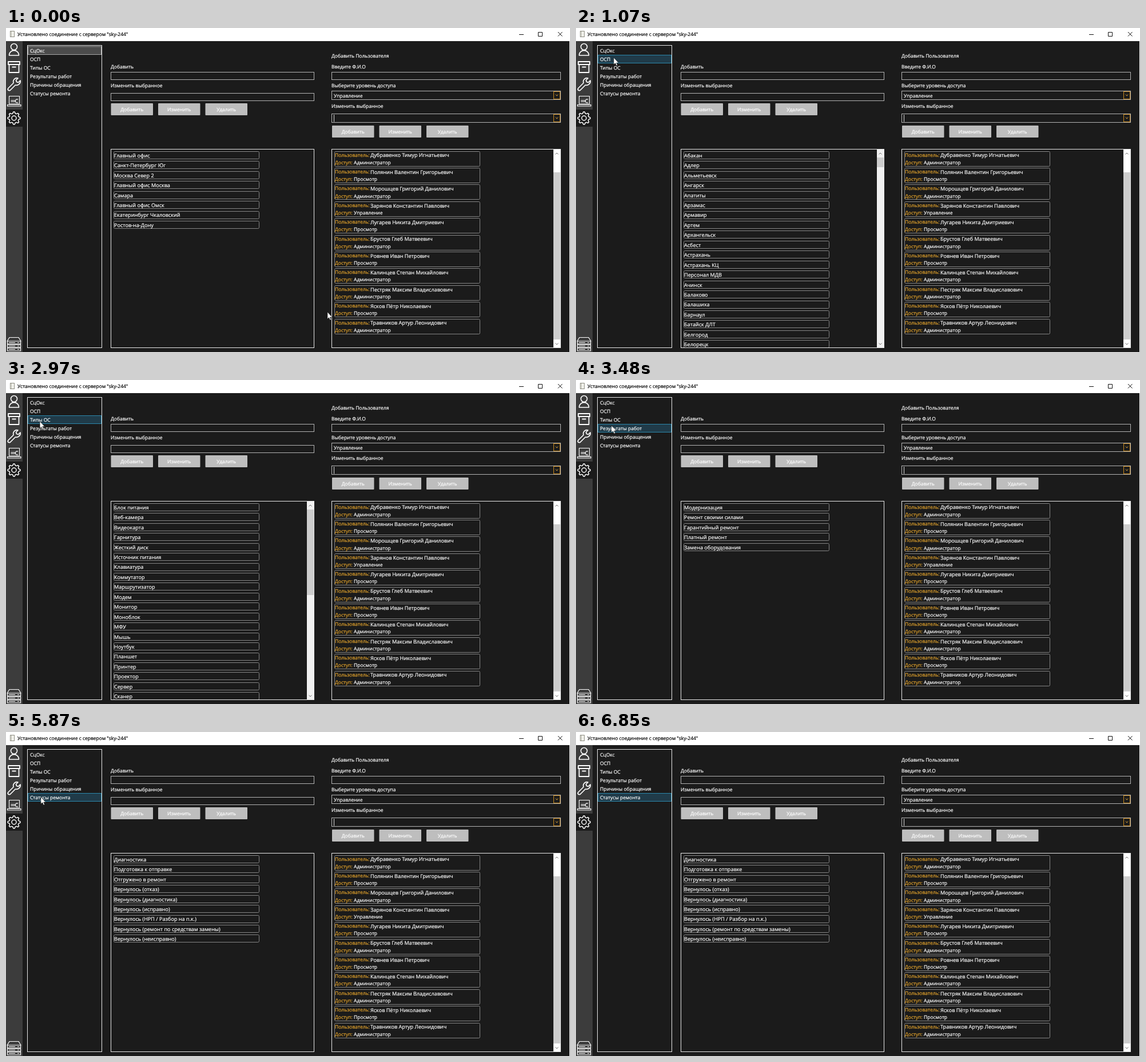
An HTML page that plays this animation: 986x568 px, repeating every 7660 ms.

```html
<!DOCTYPE html>
<html lang="ru">
<head>
<meta charset="utf-8">
<style>
html, body { margin: 0; width: 100%; height: 100%; overflow: hidden; background: #fff; }
svg { display: block; }
text { font-family: "Open Sans", "Noto Sans", sans-serif; text-rendering: geometricPrecision; white-space: pre; stroke-width: .2; }
</style>
</head>
<body>
<svg id="stage" width="986" height="568" viewBox="0 0 986 568"></svg>
<script>
const LOOP = 7660, ROW = 17.45, USER_ROW = 29.4;
const SMALL = 8.5, LARGE = 9.1;

const menu = ['СцОкс', 'ОСП', 'Типы ОС', 'Результаты работ', 'Причины обращения', 'Статусы ремонта'];
const lists = [
  'Главный офис|Санкт-Петербург Юг|Москва Север 2|Главный офис Москва|Самара|Главный офис Омск|Екатеринбург Чкаловский|Ростов-на-Дону',
  'Абакан|Адлер|Альметьевск|Ангарск|Апатиты|Арзамас|Армавир|Артем|Архангельск|Асбест|Астрахань|Астрахань КЦ|Персонал МДВ|Ачинск|Балаково|Балашиха|Барнаул|Батайск ДЛТ|Белгород|Белорецк',
  'Блок питания|Веб-камера|Видеокарта|Гарнитура|Жесткий диск|Источник питания|Клавиатура|Коммутатор|Маршрутизатор|Модем|Монитор|Моноблок|МФУ|Мышь|Ноутбук|Планшет|Принтер|Проектор|Сервер|Сканер',
  'Модернизация|Ремонт своими силами|Гарантийный ремонт|Платный ремонт|Замена оборудования',
  'Не включается|Не работает|Плановая замена|Повреждение',
  'Диагностика|Подготовка к отправке|Отгружено в ремонт|Вернулось (отказ)|Вернулось (диагностика)|Вернулось (исправно)|Вернулось (НРП / Разбор на п.к.)|Вернулось (ремонт по средствам замены)|Вернулось (неисправно)'
].map(s => s.split('|'));
const users = [
  ['Дубравенко Тимур Игнатьевич', 'Администратор'],
  ['Полянин Валентин Григорьевич', 'Просмотр'],
  ['Морошцев Григорий Данилович', 'Администратор'],
  ['Зарянов Константин Павлович', 'Управление'],
  ['Лугарев Никита Дмитриевич', 'Просмотр'],
  ['Брустов Глеб Матвеевич', 'Администратор'],
  ['Ровнев Иван Петрович', 'Просмотр'],
  ['Калинцев Степан Михайлович', 'Администратор'],
  ['Пестряк Максим Владиславович', 'Администратор'],
  ['Ясков Пётр Николаевич', 'Просмотр'],
  ['Травников Артур Леонидович', 'Администратор']
];

const text = (x, y, s, size = SMALL, fill = '#fff', extra = '') =>
  `<text x="${x}" y="${Math.round(y)}" font-size="${size}" fill="${fill}" stroke="${fill}" ${extra}>${s}</text>`;
const rect = (x, y, w, h, fill = 'none', stroke = 'none', extra = '') =>
  `<rect x="${x}" y="${y}" width="${w}" height="${h}" fill="${fill}" stroke="${stroke}" ${extra}/>`;
const path = (d, stroke = '#fff', width = 1.5, fill = 'none') =>
  `<path d="${d}" stroke="${stroke}" stroke-width="${width}" fill="${fill}" stroke-linejoin="round"/>`;
const field = (x, y, w, h) => rect(x, y, w, h, 'none', '#b4b4b4');

function buttons(x, y) {
  return ['Добавить', 'Изменить', 'Удалить'].map((s, i) =>
    rect(x + i * 82.5, y, 73.5, 21, '#bebebe', 'none', 'rx="1"') +
    text(x + i * 82.5 + 36.7, y + 14, s, SMALL, '#fff', 'text-anchor="middle"')).join('');
}

function combo(y) {
  return field(569.5, y, 400, 15) + rect(957.5, y + 1, 11, 13, 'none', '#c98a1e') +
    path(`M961 ${y + 6}l2 2.5 2-2.5`, '#d9a03a', 1);
}

function scrollbar(x, top, height, track) {
  return rect(x, 213, 12, 347, track) + rect(x, top, 12, height, '#cdcdcd') +
    path(`M${x + 3.5} 221.5l2.5-2.5 2.5 2.5M${x + 3.5} 552.5l2.5 2.5 2.5-2.5`, '#707070', 1);
}

function listView(items, i) {
  const rows = items.map((s, k) => {
    const y = Math.floor(216.3 + k * ROW);
    return rect(188.5, y + .5, 254, 13, 'none', '#858585', 'rx="2"') +
      text(189, 226.7 + k * ROW, s, LARGE);
  }).join('');
  const bar = i == 1 ? scrollbar(526, 227, 17, '#f1f1f1') : i == 2 ? scrollbar(526, 227, 150, '#f1f1f1') : '';
  return `<g class="list" clip-path="url(#inner)">${rows}${bar}</g>`;
}

function userView([name, access], i) {
  const y = 216 + i * USER_ROW, gold = '#e6a52c';
  return rect(574.5, Math.floor(y) + .5, 254, 26, 'none', '#858585', 'rx="2"') +
    text(575, y + 9.5, 'Пользователь:', SMALL, gold) + text(637, y + 10.4, name, LARGE) +
    text(575, y + 22.7, 'Доступ:', SMALL, gold) + text(608, y + 22.7, access);
}

function gear(cx, cy) {
  let d = '';
  for (let i = 0; i < 32; i++) {
    const a = (i - .5) * Math.PI / 16, r = i % 4 < 2 ? 11 : 8.4;
    d += `${i ? 'L' : 'M'}${(cx + r * Math.cos(a)).toFixed(1)} ${(cy + r * Math.sin(a)).toFixed(1)}`;
  }
  return path(d + 'Z') + `<circle cx="${cx}" cy="${cy}" r="4" fill="none" stroke="#fff" stroke-width="1.5"/>`;
}

const wrench = 'M4 105.5L13 96.5C11.5 91 16 86.5 21 88L17.5 91.5 18.5 94.5 21.5 95.5 25 92C26 97 21.5 101.5 16.5 100L7.5 109C4.5 111 2 108 4 105.5Z';
const icons =
  '<circle cx="14" cy="33" r="5.5" fill="none" stroke="#fff" stroke-width="1.6"/>' +
  path('M5.5 48C5.5 36.5 22.5 36.5 22.5 48Z', '#fff', 1.6) +
  path('M4 59H24V64H4ZM5.5 64V78H22.5V64M10.5 68.5H17.5', '#fff', 1.8) +
  path(wrench, '#fff', 1.7) +
  path('M5.5 133V119.5H23.5V133ZM2.5 134.5H26V137H2.5ZM8.5 127H16M8.5 129H16M21 125.5A3 3 0 1 0 21 130.5', '#fff', 1.1) +
  gear(14, 158) +
  path('M6 542.5H22L26 549H2ZM2.5 549H25.5V554H2.5ZM2.5 555H25.5V560H2.5ZM2.5 561H25.5V566H2.5ZM5 551.5H16M5 557.5H16M5 563.5H16M20 551.5H23M20 557.5H23M20 563.5H23', '#fff', 1.2);

const stage = document.getElementById('stage');
stage.innerHTML =
  '<clipPath id="inner"><rect x="184" y="213" width="354" height="347"/></clipPath>' +
  rect(0, 0, 986, 568, '#fff') + rect(0, 23, 985, 545, '#1b1b1b') +
  rect(0, 23, 29, 545, '#3c3c3c') + rect(0, 143, 29, 30, '#1b1b1b') +
  rect(7.5, 5.5, 7, 10, '#f4f4ee', '#8b8b80') + path('M9.5 6V15', '#b0b0a4', 1) +
  text(20, 14, 'Установлено соединение с сервером "sky-244"', SMALL, '#000') +
  path('M897 11.5H905M930.5 7.5H937.5V14.5H930.5ZM965 7L972.5 14.5M972.5 7L965 14.5', '#111', 1) +
  icons +
  rect(37.5, 30.5, 130, 530, 'none', '#e8e8e8') +
  menu.map((s, i) => rect(38.5, 32.5 + i * 15, 128, 14, 'none', 'none', 'class="item"') +
    text(42, 43 + i * 15, s)).join('') +
  text(183, 71, 'Добавить') + field(183.5, 77.5, 355, 13) +
  text(183, 104, 'Изменить выбранное') + field(183.5, 114.5, 355, 13) +
  buttons(183.5, 132) +
  text(569, 52, 'Добавить Пользователя') + text(569, 71, 'Введите Ф.И.О') +
  field(569.5, 77.5, 400, 13) + text(569, 104, 'Выберите уровень доступа') +
  combo(110.5) + text(573, 122, 'Управление') +
  text(569, 140, 'Изменить выбранное') + combo(150.5) + path('M573.5 152V164.5', '#ddd', 1) +
  buttons(570, 171) +
  rect(183.5, 212.5, 355, 348, 'none', '#e8e8e8') + lists.map(listView).join('') +
  rect(571.5, 0, 384, 28, '#1d2930', '#256279', 'id="hover"') +
  users.map(userView).join('') + scrollbar(957, 253, 293, '#fff') +
  rect(569.5, 212.5, 400, 348, 'none', '#e8e8e8') +
  '<path id="cursor" d="M0 0V12L2.7 9.6 4.6 14 6.5 13.2 4.6 9H8.3Z" fill="#fff" stroke="#111" stroke-width=".5"/>';

const items = stage.querySelectorAll('.item'), views = stage.querySelectorAll('.list');
const hover = document.getElementById('hover'), cursor = document.getElementById('cursor');

const smooth = p => p * p * (3 - 2 * p), speedUp = p => p * p, even = p => p;
// start, end, x, y, easing
const moves = [
  [10, 640, 66, 52, smooth],
  [1700, 1920, 59, 72, smooth],
  [2950, 3080, 62, 80, smooth],
  [3900, 4160, 60, 100, smooth],
  [5090, 5340, 61, 114, smooth],
  [6400, 6720, 600, 408, speedUp],
  [6720, 6750, 741, 489, even],
  [6750, 6800, 850, 552, even]
];
const clicks = [0, 1010, 2380, 3480, 4620, 5870];

function position(t) {
  let x = 562, y = 498;
  for (const [start, end, nx, ny, ease] of moves) {
    if (t < start) break;
    const p = ease(Math.min(1, (t - start) / (end - start)));
    x += (nx - x) * p;
    y += (ny - y) * p;
  }
  return [x, y];
}

function draw(t) {
  const [x, y] = position(t);
  const chosen = clicks.filter(c => t >= c).length - 1;
  const over = t >= 1010 && x > 38 && x < 167 ? Math.floor((y - 32) / 15) : -1;
  items.forEach((el, i) => {
    const [fill, stroke] = i == chosen ? (i ? ['#203b49', '#2c88ac'] : ['#4b4b4b', '#a6a6a6'])
      : i == over ? ['#1d2930', '#256279'] : ['none', 'none'];
    el.setAttribute('fill', fill);
    el.setAttribute('stroke', stroke);
  });
  views.forEach((el, i) => el.style.display = i == chosen ? '' : 'none');

  // The user row highlight trails the pointer slightly.
  const [hx, hy] = position(t - 30);
  const row = Math.floor((hy - 214) / USER_ROW);
  const lit = t > 6400 && hx > 571 && hx < 956 && row >= 0 && row < users.length;
  hover.style.display = lit ? '' : 'none';
  hover.setAttribute('y', Math.round(214 + row * USER_ROW) + .5);

  cursor.style.display = t < 6830 ? '' : 'none';
  cursor.setAttribute('transform', `translate(${x} ${y})`);
}

const begin = performance.now();
function tick() {
  draw((performance.now() - begin) % LOOP);
  requestAnimationFrame(tick);
}
tick();
</script>
</body>
</html>
```
